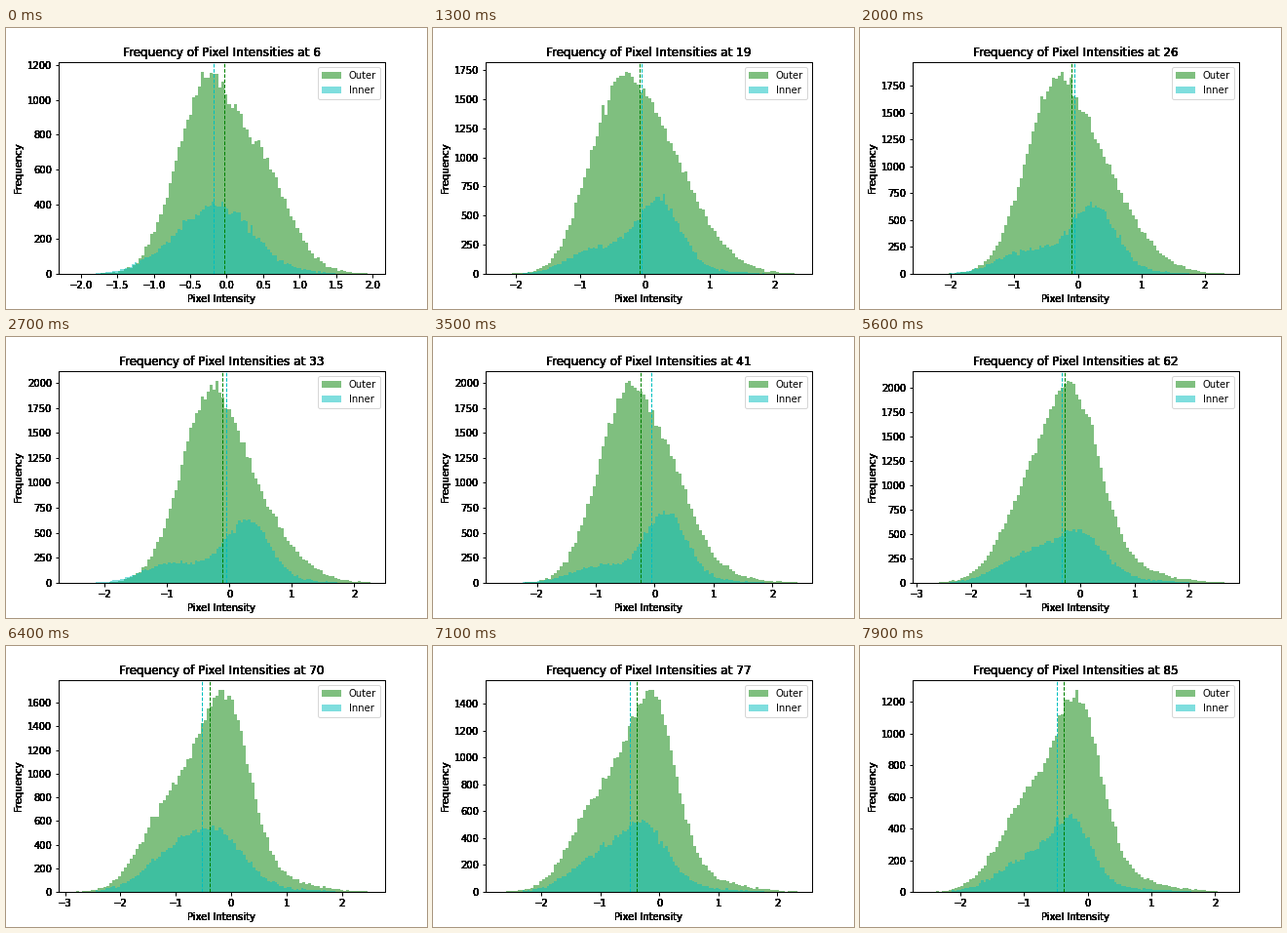
Recreate the animation shown at these times as a matplotlib script. Size 432 px wide and 288 px high, loop 8 s.

```python
import numpy as np
import matplotlib.pyplot as plt
from matplotlib.animation import FuncAnimation
from matplotlib.axes import Axes

FRAMES, INTERVAL, FIRST = 80, 100, 6
LEFT, RIGHT, HEIGHT = 54.0, 388.8, 217.44   # axes box in pixels
MARGIN = (RIGHT - LEFT) / 22                # default 5 % padding beside the data
BINS = 100

# Key states: frame, x limits, tallest bin,
# outer left bump (x, height), outer right bump (x, width, height),
# inner left height, inner right bump (x, width, height); bumps in pixels
STATES = np.array([
    (0, -2.302, 2.168, 1161, 204, 190, 264, 27, 85, 20, 222, 32, 62),
    (13, -2.466, 2.584, 1734, 187, 158, 236, 35, 95, 27, 232, 22, 70),
    (27, -2.740, 2.490, 2020, 208, 185, 260, 32, 45, 20, 247, 23, 60),
    (44, -3.020, 2.875, 2020, 188, 200, 234, 16, 75, 13, 230, 19, 75),
    (56, -3.080, 2.920, 2071, 176, 80, 220, 27, 160, 27, 225, 25, 45),
    (64, -3.116, 2.778, 1708, 173, 104, 226, 24, 185, 36, 218, 27, 50),
    (79, -2.748, 2.372, 1275, 174, 100, 225, 23, 185, 33, 218, 20, 64),
])

plt.rcParams.update({"axes.linewidth": 1, "xtick.major.width": 1, "ytick.major.width": 1})


class HeavyAxes(Axes):
    """Axes whose labels are overprinted so their soft edges turn solid."""

    def draw(self, renderer):
        super().draw(renderer)
        texts = [self.title, self.xaxis.label, self.yaxis.label]
        for k, axis in enumerate((self.xaxis, self.yaxis)):
            lo, hi = axis.get_view_interval()
            texts += [t for t in axis.get_ticklabels() if lo <= t.get_position()[k] <= hi]
        for text in texts * 9:
            text.draw(renderer)


def bump(x, mid, width, height):
    return height * np.exp(-((x - mid) / width) ** 2 / 2)


def noisy(n, rng):
    """Add counting noise, which grows with the root of the count."""
    return np.clip(n + rng.normal(0, 0.8, n.size) * np.sqrt(n), 0, None)


fig = plt.figure(figsize=(6, 4), dpi=72, facecolor="white")
ax = fig.add_axes(HeavyAxes(fig, [0.125, 0.125, 0.775, 0.755]))
ax.set_xlabel("Pixel Intensity")
ax.set_ylabel("Frequency")
title = ax.set_title("")


def layer(color, label):
    """A filled histogram and the dashed line at its mean."""
    hist = ax.stairs(np.ones(BINS), np.linspace(0, 1, BINS + 1), fill=True,
                     color=color, alpha=0.5, label=label)
    return hist, ax.axvline(0, color=color, ls="--", lw=1)


def show(hist, mean, counts, edges):
    mids = (edges[:-1] + edges[1:]) / 2
    hist.set_data(counts, edges)
    mean.set_xdata([np.average(mids, weights=counts)] * 2)


outer = layer("g", "Outer")
inner = layer("c", "Inner")
ax.legend(loc="upper right")


def update(i):
    rng = np.random.default_rng(100 + i)
    lo, hi, top, ox, oh, *rest = (np.interp(i, STATES[:, 0], col) for col in STATES[:, 1:].T)
    o_right, ih, i_right = rest[:3], rest[3], rest[4:]

    def to_x(px):
        return lo + (px - LEFT) / (RIGHT - LEFT) * (hi - lo)

    edges = np.linspace(LEFT + MARGIN, RIGHT - MARGIN, BINS + 1)
    mids = (edges[:-1] + edges[1:]) / 2
    n = bump(mids, ox, 30, oh) + bump(mids, *o_right) + bump(mids, 255, 45, 18)
    n = noisy(n * top / n.max(), rng)
    show(*outer, n * top / n.max(), to_x(edges))

    edges = np.linspace(92, 340, BINS + 1)
    mids = (edges[:-1] + edges[1:]) / 2
    n = bump(mids, 172, 30, ih) + bump(mids, *i_right) + bump(mids, 255, 45, 4)
    show(*inner, noisy(n * top * 1.05 / HEIGHT, rng), to_x(edges))

    ax.set_xlim(lo, hi)
    ax.set_ylim(0, top * 1.05)
    title.set_text(f"Frequency of Pixel Intensities at {FIRST + i}")
    return *outer, *inner, title


anim = FuncAnimation(fig, update, frames=FRAMES, interval=INTERVAL,
                     repeat=True, repeat_delay=0, blit=False)
plt.show()
```
